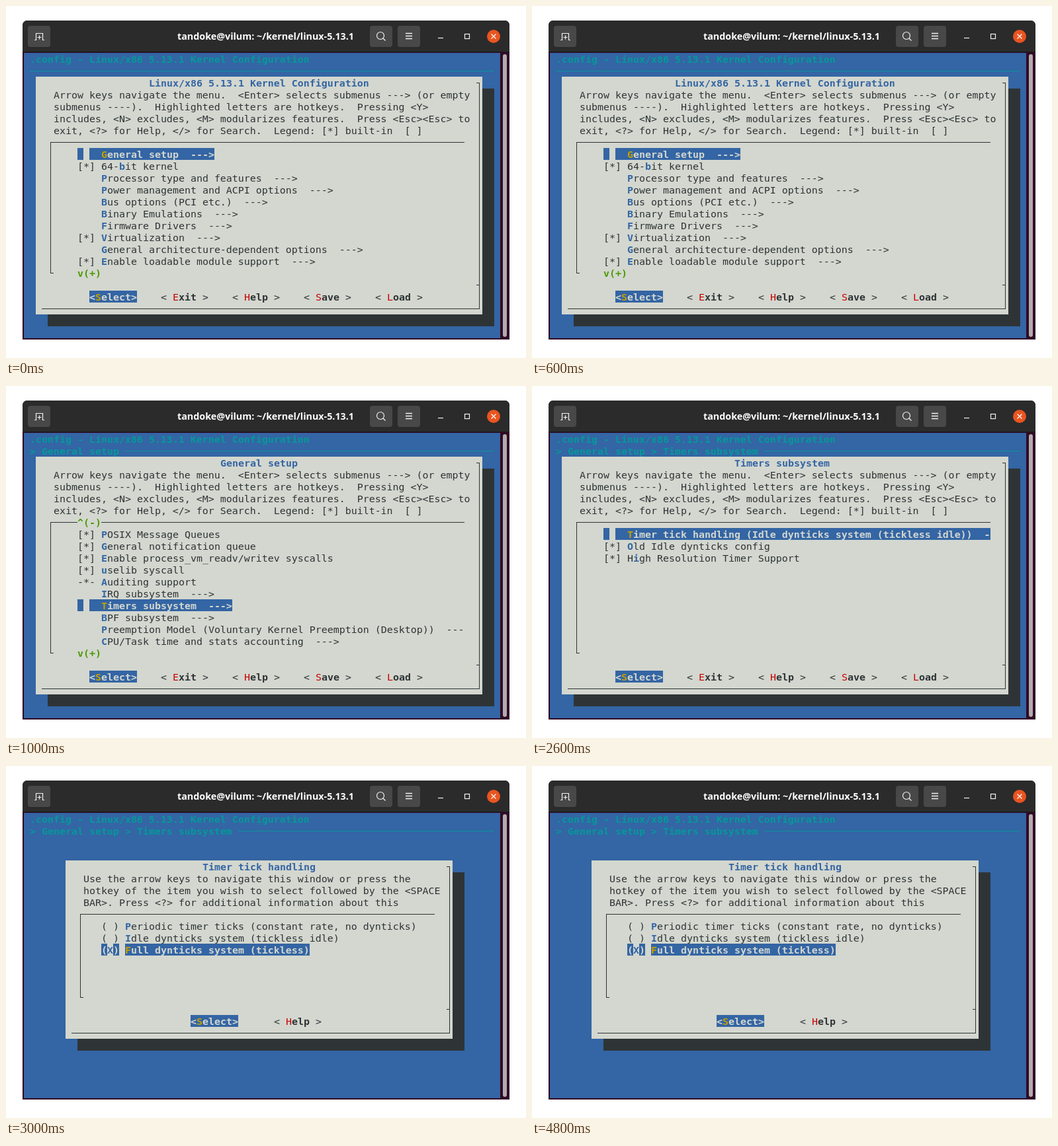
Write an HTML page that moves like this. It is 786x533 px and loops after 6000 ms.

```html
<!DOCTYPE html>
<html lang="en">
<head>
<meta charset="utf-8">
<title>Kernel configuration</title>
<style>
html, body { margin: 0; width: 100%; height: 100%; overflow: hidden; background: #fff; }
svg { display: block; width: 786px; height: 533px; }
.term text { font: 14.95px "DejaVu Sans Mono", monospace; white-space: pre; fill: #2e3436; }
.term .b { font-weight: 700; }
.term .blue { font-weight: 700; fill: #3465a4; }
.term .teal { font-weight: 700; fill: #06989a; }
.term .green { font-weight: 700; fill: #4e9a06; }
.term .gold { font-weight: 700; fill: #c4a000; }
.term .lit { font-weight: 700; fill: #d3d7cf; }
.term .red { fill: #cc0000; }
.title { font: 700 14.3px "Open Sans", sans-serif; fill: #fff; }
.screen { visibility: hidden; animation: show 6s step-end infinite; }
.screen.last { animation-name: hold; }
@keyframes show { 0% { visibility: visible; } 16.6667%, 100% { visibility: hidden; } }
@keyframes hold { 0% { visibility: visible; } 50%, 100% { visibility: hidden; } }
</style>
</head>
<body>
<svg viewBox="0 0 786 533" xmlns="http://www.w3.org/2000/svg">
  <path d="M25 505V29a7 7 0 0 1 7-7H754a7 7 0 0 1 7 7V505z" fill="#300a24"/>
  <path d="M25 70V29a7 7 0 0 1 7-7H754a7 7 0 0 1 7 7V70z" fill="#2b2b2b"/>
  <path d="M25 69.5H761" stroke="#1a1a1a"/>
  <g fill="#484848">
    <rect x="33" y="30" width="34" height="32" rx="4"/>
    <rect x="550" y="30" width="34" height="32" rx="4"/>
    <rect x="592" y="30" width="34" height="32" rx="4"/>
  </g>
  <g fill="none" stroke="#f2f2f2" stroke-width="1.2">
    <path d="M43 51.5H45.5V41.5H55.5V51.5H58M47.5 47.5H53.5M50.5 44.5V50.5"/>
    <circle cx="566" cy="45" r="5.5"/>
    <path d="M570 49L573.5 52.5"/>
    <path d="M604 41.5H614M604 45.5H614M604 49.5H614" stroke-width="1.4"/>
    <path d="M653 48.5H661"/>
    <rect x="693.5" y="42.5" width="7" height="7"/>
  </g>
  <circle cx="737" cy="46" r="10" fill="#e95420"/>
  <path d="M733.5 42.5L740.5 49.5M740.5 42.5L733.5 49.5" stroke="#fff" stroke-width="1.3"/>
  <text class="title" x="392.5" y="51" text-anchor="middle">tandoke@vilum: ~/kernel/linux-5.13.1</text>
  <rect x="27" y="71" width="720" height="432" fill="#3465a4"/>
  <rect x="751" y="73" width="6" height="428" rx="3" fill="#b2abb0"/>
  <g class="term" id="term"></g>
</svg>
<script>
const NS = "http://www.w3.org/2000/svg";
const INK = "#2e3436", PAPER = "#d3d7cf", BLUE = "#3465a4", TEAL = "#06989a";
const X = col => 27 + 9 * col, Y = row => 71 + 18 * row;
let layer;

function add(tag, attrs, parent = layer) {
  const el = document.createElementNS(NS, tag);
  for (const k in attrs) el.setAttribute(k, attrs[k]);
  return parent.appendChild(el);
}

const rect = (x, y, width, height, fill) => add("rect", { x, y, width, height, fill });
const cells = (row, col, w, h, fill) => rect(X(col), Y(row), 9 * w, 18 * h, fill);

function put(row, col, text, cls = "") {
  add("text", { x: X(col), y: Y(row) + 15, class: cls }).textContent = text;
}

// Horizontal rule through the middle of a row, between two x positions
const rule = (row, x1, x2, fill = INK) => rect(x1, Y(row) + 9, x2 - x1, 1, fill);
const mid = col => X(col) + 4;

function post(col, row1, row2) {
  rect(mid(col), Y(row1) + 9, 1, 18 * (row2 - row1) + 1, INK);
}

function screen(i, last) {
  layer = add("g", { class: last ? "screen last" : "screen" }, document.getElementById("term"));
  layer.style.animationDelay = (i ? i - 6 : 0) + "s";
}

function header(path) {
  put(0, 1, ".config - Linux/x86 5.13.1 Kernel Configuration", "teal");
  if (path) put(1, 1, path, "teal");
  rule(1, X(path ? path.length + 2 : 1), X(79), TEAL);
}

function dialog(row, col, w, h, title, titleCol, help) {
  cells(row + 1, col + 2, w, h, INK);
  cells(row, col, w, h, PAPER);
  const right = col + w - 1, bottom = row + h - 1, split = bottom - 2;
  post(right, row, bottom);
  for (const r of [row, split]) rule(r, X(right), mid(right));
  rule(bottom, X(col + 1), mid(right));
  put(row, titleCol, title, "blue");
  help.forEach((line, i) => put(row + 1 + i, col + 3, line));
}

function listBox(row, col, end, bottom) {
  post(col, row, bottom);
  rule(row, mid(col), X(end));
  rule(bottom, mid(col), X(col + 1));
}

// Label with one highlighted hotkey letter
function label(row, col, text, key, base, hot) {
  if (key) put(row, col, text.slice(0, key), base);
  put(row, col + key, text[key], hot);
  put(row, col + key + 1, text.slice(key + 1), base);
}

function item(row, text, mark = "", key = 0) {
  if (mark) put(row, 9, mark);
  label(row, 13, text, key, "", "blue");
}

function chosen(row, text) {
  cells(row, 9, 1, 1, BLUE);
  cells(row, 11, text.length + 2, 1, BLUE);
  label(row, 13, text, 0, "lit", "gold");
}

function select(row, col) {
  cells(row, col, 8, 1, BLUE);
  label(row, col, "<Select>", 1, "lit", "gold");
}

function button(row, col, name) {
  put(row, col, "<");
  label(row, col + 2, name, 0, "b", "red");
  put(row, col + 7, ">");
}

const menuHelp = [
  "Arrow keys navigate the menu.  <Enter> selects submenus ---> (or empty",
  "submenus ----).  Highlighted letters are hotkeys.  Pressing <Y>",
  "includes, <N> excludes, <M> modularizes features.  Press <Esc><Esc> to",
  "exit, <?> for Help, </> for Search.  Legend: [*] built-in  [ ]"
];

function menu(title, titleCol, rows, pick, up, down) {
  dialog(2, 2, 75, 20, title, titleCol, menuHelp);
  listBox(7, 4, 74, 18);
  rows.forEach((r, i) => i === pick ? chosen(8 + i, r[0]) : item(8 + i, ...r));
  if (up) {
    cells(7, 9, 4, 1, PAPER);
    put(7, 9, "^(-)", "green");
  }
  if (down) put(18, 9, "v(+)", "green");
  select(20, 11);
  ["Exit", "Help", "Save", "Load"].forEach((name, i) => button(20, 23 + 12 * i, name));
}

screen(0);
header("");
menu("Linux/x86 5.13.1 Kernel Configuration", 21, [
  ["General setup  --->"],
  ["64-bit kernel", "[*]", 3],
  ["Processor type and features  --->"],
  ["Power management and ACPI options  --->"],
  ["Bus options (PCI etc.)  --->"],
  ["Binary Emulations  --->"],
  ["Firmware Drivers  --->"],
  ["Virtualization  --->", "[*]"],
  ["General architecture-dependent options  --->"],
  ["Enable loadable module support  --->", "[*]"]
], 0, false, true);

screen(1);
header("> General setup");
menu("General setup", 33, [
  ["POSIX Message Queues", "[*]"],
  ["General notification queue", "[*]"],
  ["Enable process_vm_readv/writev syscalls", "[*]"],
  ["uselib syscall", "[*]"],
  ["Auditing support", "-*-"],
  ["IRQ subsystem  --->"],
  ["Timers subsystem  --->"],
  ["BPF subsystem  --->"],
  ["Preemption Model (Voluntary Kernel Preemption (Desktop))  ---"],
  ["CPU/Task time and stats accounting  --->"]
], 6, true, true);

screen(2);
header("> General setup > Timers subsystem");
menu("Timers subsystem", 31, [
  ["Timer tick handling (Idle dynticks system (tickless idle))  -"],
  ["Old Idle dynticks config", "[*]"],
  ["High Resolution Timer Support", "[*]", 1]
], 0, false, false);

screen(3, true);
header("> General setup > Timers subsystem");
dialog(4, 7, 65, 15, "Timer tick handling", 30, [
  "Use the arrow keys to navigate this window or press the",
  "hotkey of the item you wish to select followed by the <SPACE",
  "BAR>. Press <?> for additional information about this"
]);
listBox(8, 9, 69, 15);
["Periodic timer ticks (constant rate, no dynticks)", "Idle dynticks system (tickless idle)"].forEach((text, i) => {
  put(9 + i, 13, "( )");
  label(9 + i, 17, text, 0, "", "blue");
});
const full = "Full dynticks system (tickless)";
cells(11, 13, 3, 1, BLUE);
cells(11, 14, 1, 1, PAPER);
label(11, 13, "(X)", 1, "lit", "blue");
cells(11, 17, full.length, 1, BLUE);
label(11, 17, full, 0, "lit", "gold");
select(17, 28);
button(17, 42, "Help");
</script>
</body>
</html>
```
